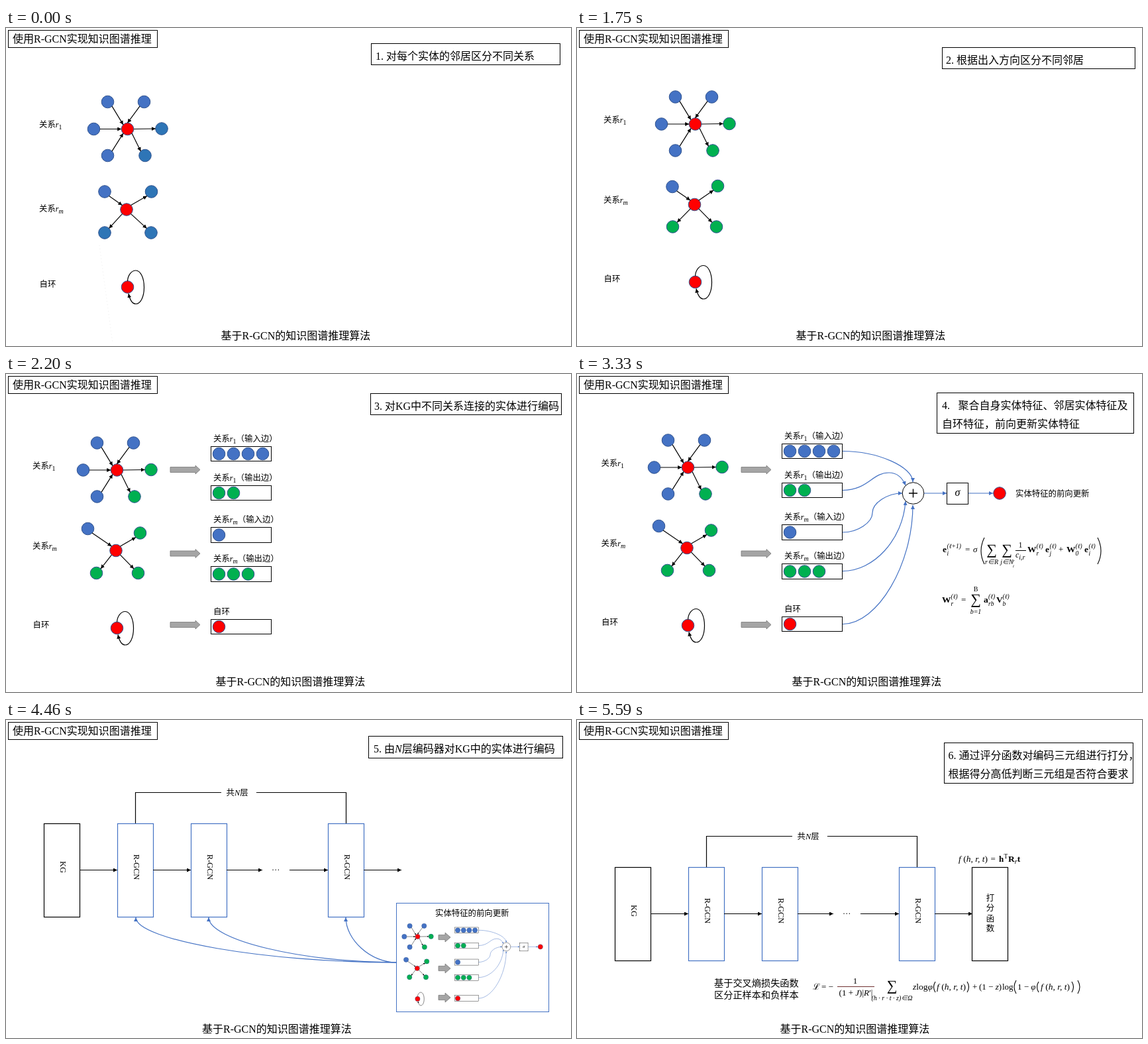
Write an HTML page that moves like this. It is 853 by 480 pixels and loops after 6.72 s.

```html
<!DOCTYPE html>
<html lang="zh">
<head>
<meta charset="utf-8">
<style>
  html, body { margin: 0; width: 100%; height: 100%; overflow: hidden; background: #fff; }
  svg { display: block; width: 853px; height: 480px; }
  text { font-family: 'Liberation Serif', 'Noto Sans CJK SC', 'Noto Sans CJK', 'DejaVu Serif', 'DejaVu Sans', serif; font-weight: 300; }
  .i { font-style: italic; }
  .b { font-weight: bold; }
  .m { text-anchor: middle; }
</style>
</head>
<body>
<svg id="stage" viewBox="0 0 853 480"></svg>
<script>
const BLACK = '#000', BLUE = '#4472c4', STEEL = '#2e75b6', GREEN = '#00b050', RED = '#f00';
const R = 9.3, SMALL = 12.4;

const text = (x, y, s, size = 16, cls = '') =>
  `<text x="${x}" y="${y}" font-size="${size}" class="${cls}">${s}</text>`;
const italic = s => `<tspan class="i">${s}</tspan>`;
const bold = s => `<tspan class="b">${s}</tspan>`;
const sub = s => `<tspan class="${s === '1' ? '' : 'i'}" font-size="10" dy="2.5">${s}</tspan><tspan dy="-2.5">&#8203;</tspan>`;
const path = (d, color = BLACK, width = 1.2, extra = '') =>
  `<path d="${d}" fill="none" stroke="${color}" stroke-width="${width}" ${extra}/>`;
const arrow = (d, color = BLACK) =>
  path(d, color, 1.2, `marker-end="url(#${color === BLUE ? 'blueTip' : 'blackTip'})"`);
const box = (x1, y1, x2, y2, color = BLACK, width = 1) =>
  `<rect x="${x1 + .5}" y="${y1 + .5}" width="${x2 - x1}" height="${y2 - y1}" fill="#fff" stroke="${color}" stroke-width="${width}"/>`;
const node = (x, y, color) =>
  `<circle cx="${x}" cy="${y}" r="${R}" fill="${color}" stroke="#2f528f"/>`;
const blockArrow = (x, y, length, head, half, shaft) =>
  `<path d="M${x} ${y - shaft}h${length - head}v${shaft - half}l${head} ${half}l${-head} ${half}v${shaft - half}h${head - length}z" fill="#a5a5a5" stroke="#787878" stroke-width=".8"/>`;

// Links attach to a node at the nearest multiple of 45 degrees.
const snap = (dx, dy) => Math.round(Math.atan2(dy, dx) * 4 / Math.PI) * 45;
const port = (x, y, degrees) => {
  const a = degrees * Math.PI / 180;
  return `${x + R * Math.cos(a)} ${y + R * Math.sin(a)}`;
};

function hub(cx, cy, ins, outs, outColor) {
  const links = [], nodes = [node(cx, cy, RED)];
  for (const [dx, dy, entry = snap(dx, dy)] of ins) {
    links.push(arrow(`M${port(cx + dx, cy + dy, snap(-dx, -dy))}L${port(cx, cy, entry)}`));
    nodes.push(node(cx + dx, cy + dy, BLUE));
  }
  for (const [dx, dy] of outs) {
    links.push(arrow(`M${port(cx, cy, snap(dx, dy))}L${port(cx + dx, cy + dy, snap(-dx, -dy))}`));
    nodes.push(node(cx + dx, cy + dy, outColor));
  }
  return nodes.join('') + links.join('');
}

const star = (cx, cy, outColor) =>
  hub(cx, cy, [[-30, -41], [25, -41, -90], [-51, 0], [-30, 40]], [[51.5, -.5], [26.5, 40]], outColor);

const selfLoop = (x, y) => node(x, y, RED) +
  arrow(`M${x} ${y - 9}c.5 -9 6 -16 12.5 -16c7 0 12.5 11 12.5 25.5s-5.5 25 -12.5 25q-7.5 0 -11 -15.5`);

const relation = s => '关系' + italic('r') + sub(s);
const leftLabels = (x, y1, y2, y3) =>
  text(x, y1, relation('1'), SMALL) + text(x, y2, relation('m'), SMALL) + text(x + .5, y3, '自环', SMALL);

const rows = [
  [109, 131, BLUE, 4, relation('1') + '（输入边）'],
  [168, 190, GREEN, 2, relation('1') + '（输出边）'],
  [231, 254, BLUE, 1, relation('m') + '（输入边）'],
  [290, 313, GREEN, 3, relation('m') + '（输出边）'],
  [370, 392, RED, 1, '自环']
];
const encodings = dy => rows.map(([top, bottom, color, count]) =>
  box(309, top + dy, 400, bottom + dy) +
  Array.from({ length: count }, (_, i) => node(321.5 + 22 * i, (top + bottom) / 2 + .5 + dy, color)).join('')).join('');
const encodingLabels = dy => rows.map(row => text(313, row[0] - 7 + dy, row[4], SMALL)).join('');
const blockArrows = () => [144.5, 271, 378.5].map(y => blockArrow(248, y, 45, 7, 6.5, 4)).join('');

const leftGraphs = dy => star(167.5, 145 + dy, GREEN) +
  hub(166, 266.5 + dy, [[-42.5, -33]], [[36.5, -26.5], [-29.5, 34], [33.5, 34]], GREEN) +
  selfLoop(167.5, 383.5 + dy);

const aggregation = () => leftGraphs(-4) + encodings(-4) +
  arrow('M401 116.5C454 116.5 507 140 507 163', BLUE) +
  arrow('M401 175.5C440 175 445 149 471 149Q488 149 496 168', BLUE) +
  arrow('M401 239C424 239 446 224 446 209.5S468 180 491 180', BLUE) +
  arrow('M401 297.5C448 297.5 492 250 496 192', BLUE) +
  arrow('M401 377.5C454 377.5 507 287 507 198', BLUE) +
  '<circle cx="507.5" cy="180" r="16.3" fill="#fff" stroke="#000"/>' +
  path('M501 180h13M507.5 173.5v13', BLACK, 1.4) +
  arrow('M524 180H558', BLUE) + box(558, 164, 590, 196) + text(574.5, 184, 'σ', 16, 'i m') +
  arrow('M591 180H628', BLUE) + node(638, 180, RED);

// Formula parts
const scripted = (x, y, base, width, upper, lower) =>
  text(x, y, base, 13.5, 'b') + text(x + width, y - 6, upper, 9.5, 'i') + text(x + width, y + 5, lower, 9.5, 'i');
const sum = (x, y, under, over = '') =>
  text(x, y + 6, '∑', 22, 'm') + text(x, y + 21, under, 10, 'i m') + text(x, y - 13, over, 10, 'm');
const paren = (x, y, half, bend) =>
  path(`M${x} ${y - half}q${bend * 2} ${half} 0 ${half * 2}`, BLACK, 1.1);
const score = italic('f') + ' (' + italic('h, r, t') + ')';

const updateFormula = () =>
  scripted(552, 269, 'e', 6.5, '(ℓ+1)', 'i') + text(586, 269, '=', 13) + text(598, 269, 'σ', 13, 'i') +
  paren(615, 267, 20, -5) + sum(626, 266, 'r∈R') + sum(649, 266, 'j∈N') +
  text(658, 284, 'r', 6.5, 'i') + text(658, 292, 'i', 6.5, 'i') +
  text(669.5, 262, '1', 12, 'm') + path('M662 266.5h16', BLACK, 1) + text(662, 277, 'c' + sub('i,r'), 12, 'i') +
  scripted(680, 269, 'W', 13.5, '(ℓ)', 'r') + scripted(707, 269, 'e', 6.5, '(ℓ)', 'j') + text(727, 269, '+', 13) +
  scripted(739, 269, 'W', 13.5, '(ℓ)', '0') + scripted(766, 269, 'e', 6.5, '(ℓ)', 'i') + paren(786, 267, 20, 5);

const weightFormula = () =>
  scripted(551, 345, 'W', 13.5, '(ℓ)', 'r') + text(580, 345, '=', 13) + sum(602, 341, 'b=1', 'B') +
  scripted(614, 345, 'a', 7, '(ℓ)', 'rb') + scripted(633, 345, 'V', 9.5, '(ℓ)', 'b');

const lossFormula = () =>
  text(356, 407, 'ℒ', 13) + text(369, 407, '= −', 13) +
  text(420, 398, '1', 13, 'm') + path('M393 402.5h56', '#703030', 1) +
  text(421, 416, '(1 + ' + italic('J') + ')|' + italic('R') + '′|', 13, 'm') +
  sum(475.5, 402, '(h · r · t · z)∈Ω') +
  text(507, 407, italic('z') + 'log' + italic('φ'), 13.5) + paren(541, 403, 8, -2.5) +
  text(543, 407, score, 13.5) + paren(589, 403, 8, 2.5) +
  text(597, 407, '+', 13) + text(607, 407, '(1 − ' + italic('z') + ')', 13) + text(642, 407, 'log', 13) +
  paren(663, 403, 10, -3) + text(665, 407, '1 − ' + italic('φ'), 13) +
  paren(697, 403, 8, -2.5) + text(700, 407, score, 13.5) + paren(747, 403, 8, 2.5) + paren(756, 403, 10, 3);

// Stack of encoder layers, placed by the top of its boxes
function encoderStack(top) {
  const mid = top + 70.5, barY = top - 46.5;
  const block = (x, label, color) => box(x, top, x + 54, top + 141, color, 1.2) +
    `<g transform="translate(${x + 24.5} ${top + 66}) rotate(90)">${text(0, 0, label, SMALL, 'm')}</g>`;
  const links = [[111, 168], [222, 279], [333, 387], [428, 486], [540, 597]];
  return path(`M195.5 ${top}V${barY}H325M378 ${barY}H513.5V${top}`) +
    text(332.5, barY + 4.5, '共' + italic('N') + '层', SMALL) +
    block(57, 'KG', BLACK) + [168, 279, 486].map(x => block(x, 'R-GCN', BLUE)).join('') +
    links.map(([a, b]) => arrow(`M${a} ${mid}H${b}`)).join('') + text(401, mid + .5, '…', SMALL);
}

const inset = () => box(589, 276, 819, 440, BLUE) + text(648, 296, '实体特征的前向更新', SMALL) +
  `<g transform="translate(555.4 271.4) scale(.394)">${aggregation()}</g>` +
  [328, 375, 419].map(y => blockArrow(653, y, 18, 8, 7, 3.6)).join('') +
  [196, 306, 513].map(x => arrow(`M589 366C${(589 + x) / 2} 366 ${x} 332 ${x} 298`, BLUE)).join('');

const caption = (x, y = 470) => text(x, y, '基于R-GCN的知识图谱推理算法');

const scenes = [
  [0, () => box(551, 23, 836, 55) + text(558, 48, '1. 对每个实体的邻居区分不同关系') + caption(324.5) +
    leftLabels(50, 150, 277, 391) + star(183.5, 152.5, STEEL) +
    hub(182, 274, [[-33, -27]], [[37.5, -27], [-33, 35], [37, 35]], STEEL) + selfLoop(183.5, 391) +
    path('M141 328L161 476', '#eee', 1, 'stroke-dasharray="1 4"')],

  [1070, () => box(551, 29, 842, 61) + text(557, 54, '2. 根据出入方向区分不同邻居') + caption(330.5) +
    leftLabels(40, 143, 264, 383) + star(178.5, 145, GREEN) +
    hub(177.5, 266.5, [[-33.5, -27]], [[35, -28], [-33, 33.5], [33, 33.5]], GREEN) + selfLoop(178.5, 383.5)],

  [2200, () => box(550, 29, 838, 61) + text(556, 54, '3. 对KG中不同关系连接的实体进行编码') + caption(316.5) +
    leftLabels(40, 143, 264, 383) + leftGraphs(0) + blockArrows() + encodings(0) + encodingLabels(0)],

  [3330, () => box(543, 28, 840, 89) + text(551, 53, '4.') + text(575.5, 53, '聚合自身实体特征、邻居实体特征及') +
    text(551, 81, '自环特征，前向更新实体特征') + caption(324.5) +
    leftLabels(36.5, 139, 260, 379) + blockArrows() + encodingLabels(-4) + aggregation() +
    text(662, 184.5, '实体特征的前向更新', SMALL) + updateFormula() + weightFormula()],

  [4460, () => box(547, 24, 840, 57) + text(555, 49, '5. 由' + italic('N') + '层编码器对KG中的实体进行编码') +
    caption(296, 472) + encoderStack(156) + inset()],

  [5590, () => box(554, 34, 839, 95) + text(560.5, 59, '6. 通过评分函数对编码三元组进行打分，') +
    text(560.5, 86.5, '根据得分高低判断三元组是否符合要求') + caption(306.5, 472) +
    encoderStack(222) + box(596, 222, 650, 363, BLACK, 1.2) +
    [...'打分函数'].map((c, i) => text(624, 273 + 15.3 * i, c, SMALL, 'm')).join('') +
    text(576, 214, score, 13.5) + text(624.5, 214, '=', 13) + text(637, 214, 'h', 13, 'b') + text(644.5, 209, 'T', 9.5) +
    text(651, 214, bold('R') + sub('r') + bold('t'), 13.5) +
    text(207, 402, '基于交叉熵损失函数', 14.2) + text(207, 420, '区分正样本和负样本', 14.2) + lossFormula()]
];

const LOOP = 6720;
const tip = (id, color) =>
  `<marker id="${id}" markerUnits="userSpaceOnUse" markerWidth="7" markerHeight="6" refX="6" refY="3" orient="auto"><path d="M0 0L6 3L0 6z" fill="${color}"/></marker>`;
const stage = document.getElementById('stage');
stage.innerHTML = `<defs>${tip('blackTip', BLACK)}${tip('blueTip', BLUE)}</defs>` +
  box(3, 3, 228, 29) + text(10, 22, '使用R-GCN实现知识图谱推理') +
  scenes.map(([, draw]) => `<g class="scene" display="none">${draw()}</g>`).join('');
const groups = [...stage.querySelectorAll('.scene')];

function show(now) {
  const time = now % LOOP;
  const current = scenes.filter(([start]) => start <= time).length - 1;
  groups.forEach((g, i) => g.setAttribute('display', i === current ? 'inline' : 'none'));
}
const begin = performance.now();
function tick() {
  show(performance.now() - begin);
  requestAnimationFrame(tick);
}
tick();
</script>
</body>
</html>
```
